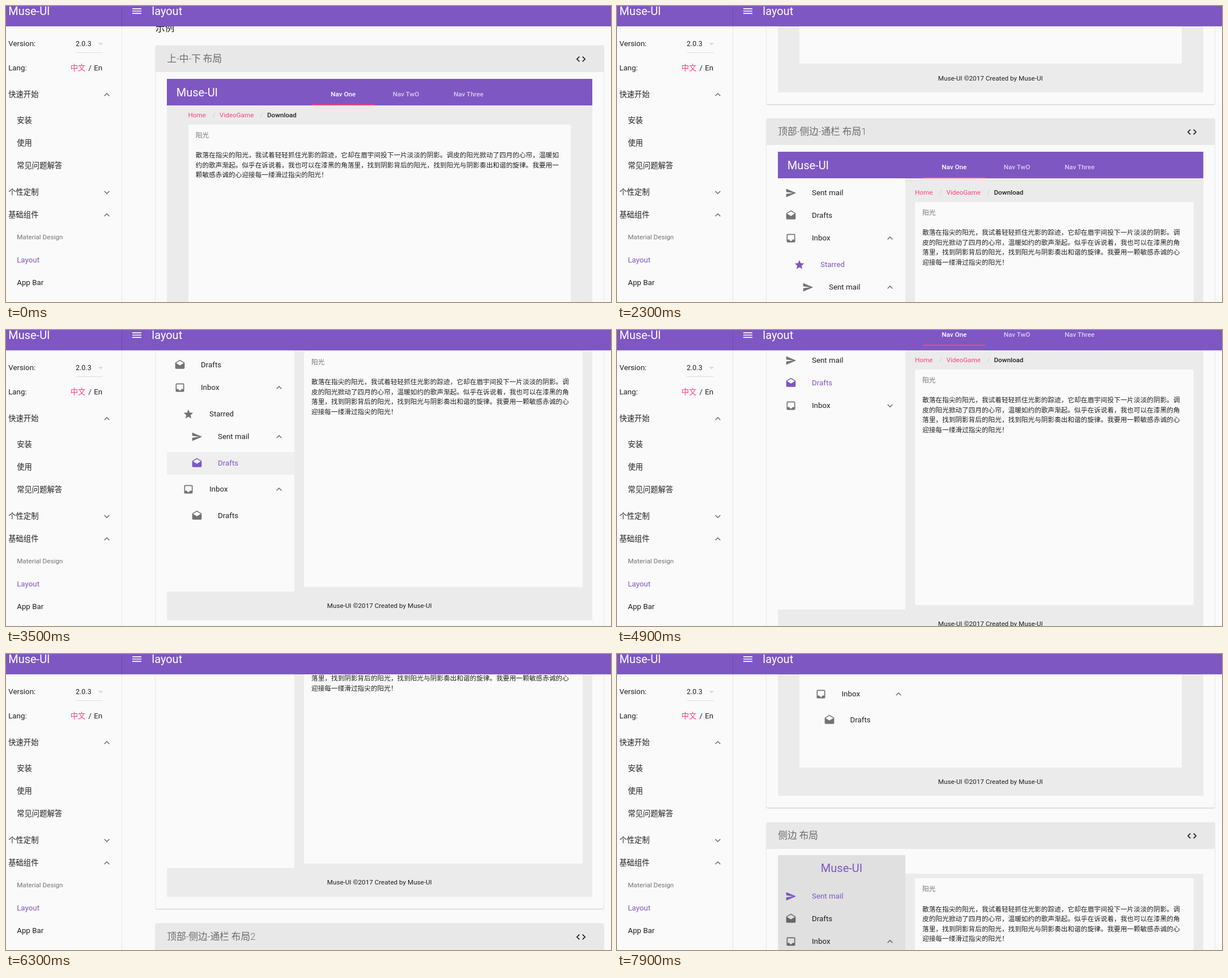
An HTML page that plays this animation: 1068 px wide and 524 px high, repeating every 8000 ms.

```html
<!DOCTYPE html>
<html lang="zh-CN">
<head>
<meta charset="utf-8">
<title>layout</title>
<style>
  html, body { margin: 0; width: 100%; height: 100%; overflow: hidden; background: #fafafa; }
  body {
    font-family: Roboto, "Noto Sans CJK SC", "Noto Sans CJK", sans-serif;
    color: rgba(0, 0, 0, .87);
    text-spacing-trim: space-all;
    text-autospace: no-autospace;
  }
  #stage { position: relative; width: 1068px; height: 524px; overflow: hidden; }
  #stage div, #stage svg { position: absolute; }
  .text { white-space: pre; line-height: 20px; }
  .card { background: #fafafa; border-radius: 2px; box-shadow: 0 1px 2px rgba(0,0,0,.2), 0 0 1px rgba(0,0,0,.16); }
  .body { font-size: 11.667px; line-height: 17.5px; font-weight: 300; }
  .tabs { z-index: 3; }
  .fixed { z-index: 2; }
</style>
</head>
<body>
<div id="stage"></div>
<script>
const PURPLE = '#7e57c2', PINK = '#ff4081', PAPER = '#fafafa', GRAY = '#ebebeb';
const DARK = 'rgba(0,0,0,.87)', MUTED = 'rgba(0,0,0,.54)', FADED = 'rgba(255,255,255,.7)';
const SMALL = 11.667, NORMAL = 13.333, LARGE = 16.667, TITLE = 20;
const ROW = 40, PAD = 6.667, TAB = 110.67, BAR = 47;
const LEFT = 284, WIDTH = 750.5;

const ICONS = {
  send: 'M2 21L23 12 2 3v7l15 2-15 2z',
  drafts: 'M22 8c0-.72-.37-1.35-.94-1.7L12 1 2.95 6.3C2.38 6.65 2 7.28 2 8v10c0 1.1.9 2 2 2h16c1.1 0 2-.9 2-2zM12 13L3.74 7.84 12 3l8.26 4.84z',
  inbox: 'M19 3H5c-1.1 0-2 .9-2 2v14c0 1.1.9 2 2 2h14c1.1 0 2-.9 2-2V5c0-1.1-.9-2-2-2zm0 12h-4c0 1.66-1.35 3-3 3s-3-1.34-3-3H5V5h14z',
  star: 'M12 17.27L18.18 21l-1.64-7.03L22 9.24l-7.19-.61L12 2 9.19 8.63 2 9.24l5.46 4.73L5.82 21z',
  code: 'M9.4 16.6L4.8 12l4.6-4.6L8 6l-6 6 6 6zm5.2 0l4.6-4.6-4.6-4.6L16 6l6 6-6 6z',
  more: 'M16.59 8.59L12 13.17 7.41 8.59 6 10l6 6 6-6z',
  menu: 'M2.4 6h19.2v2H2.4zm0 5h19.2v2H2.4zm0 5h19.2v2H2.4z',
  drop: 'M7 10l5 5 5-5z'
};

// [icon, label, list depth, indent, expandable]
const MAIL = [
  ['send', 'Sent mail', 0, 0], ['drafts', 'Drafts', 0, 0], ['inbox', 'Inbox', 0, 0, true],
  ['star', 'Starred', 1, 1], ['send', 'Sent mail', 1, 2, true], ['drafts', 'Drafts', 2, 2],
  ['inbox', 'Inbox', 1, 1, true], ['drafts', 'Drafts', 2, 2]
];
const PROSE = '散落在指尖的阳光，我试着轻轻抓住光影的踪迹，它却在眉宇间投下一片淡淡的阴影。' +
  '调皮的阳光掀动了四月的心帘，温暖如约的歌声渐起。似乎在诉说着，我也可以在漆黑的角落里，' +
  '找到阴影背后的阳光，找到阳光与阴影奏出和谐的旋律。我要用一颗敏感赤诚的心迎接每一缕滑过指尖的阳光！';

function box(parent, x, y, w, h, background = '', className = '') {
  const el = document.createElement('div');
  Object.assign(el.style, { left: x + 'px', top: y + 'px', width: w + 'px', height: h + 'px', background });
  el.className = className;
  parent.append(el);
  return el;
}

// cy is the vertical middle; align is the share of the text's width left of x
function text(parent, x, cy, string, size = NORMAL, color = DARK, weight = 400, align = 0) {
  const el = box(parent, x, cy - 10, 0, 20, '', 'text');
  Object.assign(el.style, { width: 'auto', fontSize: size + 'px', color, fontWeight: weight });
  if (align) el.style.transform = `translateX(${-100 * align}%)`;
  el.textContent = string;
  return el;
}

function icon(parent, cx, cy, name, color = MUTED, turned = false) {
  const svg = document.createElementNS('http://www.w3.org/2000/svg', 'svg');
  svg.setAttribute('viewBox', '0 0 24 24');
  Object.assign(svg.style, {
    left: cx - 10 + 'px', top: cy - 10 + 'px', width: '20px', height: '20px',
    fill: color, transform: turned ? 'rotate(180deg)' : ''
  });
  svg.innerHTML = `<path d="${ICONS[name]}"/>`;
  parent.append(svg);
  return svg;
}

function card(top, height, title) {
  const el = box(scroller, 264, top, 791, height, '', 'card');
  box(el, 0, 0, 791, 47, '#e8e8e8').style.borderRadius = '2px 2px 0 0';
  text(el, 20.3, 23.7, title, LARGE, MUTED, 300);
  icon(el, 750.5, 23.7, 'code', DARK);
  return box(scroller, LEFT, top + 59, WIDTH, height - 79);
}

function appBar(parent) {
  box(parent, 0, 0, WIDTH, BAR, PURPLE);
  text(parent, 16.7, 23.7, 'Muse-UI', TITLE, '#fff');
  const tabs = box(parent, 256, 0, TAB * 3, BAR, '', 'tabs');
  const labels = ['Nav One', 'Nav TwO', 'Nav Three'].map((label, i) =>
    text(tabs, TAB * (i + .5), 27.3, label, SMALL, i ? FADED : '#fff', 500, .5));
  return { labels, line: box(tabs, 0, BAR - 2, TAB, 2, PINK) };
}

function breadcrumb(parent, x, cy) {
  [[0, 'Home', PINK], [43.3, '/', '#ccc'], [55.5, 'VideoGame', PINK], [127, '/', '#ccc']]
    .forEach(([dx, label, color]) => text(parent, x + dx, cy, label, SMALL, color));
  text(parent, x + 139.5, cy, 'Download', SMALL, DARK, 500);
}

function article(parent, x, y, columns) {
  text(parent, x, y + 19, '阳光', SMALL, MUTED, 300);
  const el = box(parent, x, y + 46.2, (columns + .3) * SMALL, 80, '', 'body');
  el.textContent = PROSE;
}

function panel(parent, x, y, w, radius = 3) {
  box(parent, x, y, w, 416.7, PAPER).style.borderRadius = radius + 'px';
}

function footer(parent, cy) {
  text(parent, WIDTH / 2, cy, 'Muse-UI ©2017 Created by Muse-UI', SMALL, DARK, 400, .5);
}

function mailList(parent, x, y, width, selected) {
  const list = box(parent, x, y, width, 0);
  const foldTop = PAD + 3 * ROW;
  const fold = box(list, 0, foldTop, width, 247);
  fold.style.overflow = 'hidden';
  let cy = PAD - ROW / 2, last = 0;
  const rows = MAIL.map(([name, label, depth, indent, expandable], i) => {
    cy += ROW + PAD * Math.abs(depth - last);
    last = depth;
    const nested = depth > 0;
    const row = box(nested ? fold : list, 0, cy - ROW / 2 - (nested ? foldTop : 0), width, ROW);
    const color = i === selected ? PURPLE : MUTED;
    return {
      row,
      icon: icon(row, 23.3 + 15 * indent, 20, name, color),
      label: text(row, 60 + 15 * indent, 20, label, NORMAL, i === selected ? PURPLE : DARK),
      arrow: expandable && icon(row, width - 26.7, 20, 'more', MUTED, true)
    };
  });
  return { rows, fold };
}

const stage = document.getElementById('stage');
const scroller = box(stage, 0, 0, 1068, 2700);
text(scroller, 264, 40, '示例', LARGE, DARK, 300);

const first = card(70, 628.5, '上-中-下 布局');
box(first, 0, BAR, WIDTH, 502, GRAY);
const firstTabs = appBar(first);
breadcrumb(first, 37.5, 63.5);
panel(first, 37.5, 81, 675.5);
article(first, 50.8, 81, 55);
footer(first, 523.5);

const second = card(724, 645, '顶部-侧边-通栏 布局1');
box(second, 0, BAR, WIDTH, 518, GRAY);
appBar(second);
box(second, 0, BAR, 225, 467, PAPER);
const mail = mailList(second, 0, 46.7, 225, 3);
breadcrumb(second, 242, 71.7);
panel(second, 241.7, 89, 492.5);
article(second, 255, 89, 39);
footer(second, 539.4);

const third = card(1395, 628.5, '顶部-侧边-通栏 布局2');
box(third, 0, BAR, WIDTH, 502, GRAY);
appBar(third);
breadcrumb(third, 37.5, 64.2);
panel(third, 37.5, 82, 675.5, 0);
mailList(third, 37.5, 82, 202.5, 0);
article(third, 253.5, 82, 38);
footer(third, 523.5);

const fourth = card(2050, 600, '侧边 布局');
box(fourth, 225, 32, WIDTH - 225, 480, GRAY);
box(fourth, 0, -1, 225, 513, '#e0e0e0');
text(fourth, 112.5, 22, 'Muse-UI', TITLE, PURPLE, 400, .5);
mailList(fourth, 0, 45.3, 225, 0);
panel(fourth, 241.7, 40.4, 492.5, 0);
article(fourth, 255, 40.4, 39);

const drawer = box(stage, 0, 0, 204, 524, PAPER, 'fixed');
drawer.style.borderRight = '1px solid #e6e6e6';
text(drawer, 4.2, 66.5, 'Version:');
text(drawer, 123, 66.5, '2.0.3', 12.5);
icon(drawer, 167.3, 66.5, 'drop', '#d6d6d6');
box(drawer, 123, 82, 48, 1, '#dedede');
text(drawer, 4.2, 109.5, 'Lang:');
text(drawer, 113.8, 109.5, '中文', NORMAL, PINK, 300);
text(drawer, 145.5, 109.5, '/');
text(drawer, 155.3, 109.5, 'En');
[['快速开始', 156.5, true], ['个性定制', 329.7, false], ['基础组件', 369.7, true]].forEach(([label, cy, open]) => {
  text(drawer, 4.2, cy, label, NORMAL, DARK, 300);
  icon(drawer, 177.5, cy, 'more', MUTED, open);
});
[['安装', 203], ['使用', 243], ['常见问题解答', 283]]
  .forEach(([label, cy]) => text(drawer, 19.2, cy, label, NORMAL, DARK, 300));
text(drawer, 19.2, 409.3, 'Material Design', SMALL, MUTED);
text(drawer, 19.2, 449.5, 'Layout', NORMAL, PURPLE);
text(drawer, 19.2, 489.5, 'App Bar');

const header = box(stage, 0, 0, 1068, 36, PURPLE, 'fixed');
box(header, 204, 0, 1, 36, '#7049b0');
text(header, 4.2, 9, 'Muse-UI', TITLE, '#fff');
icon(header, 230.6, 9, 'menu', '#fff');
text(header, 257.3, 9, 'layout', TITLE, '#fff');

// Each run: start time, then one value per 100 ms
const SCROLL = [
  [1500, 25, 100, 180, 240, 300, 360, 420, 475, 525, 612, 664],
  [2700, 678, 718, 768, 827, 834],
  [4900, 802, 720, 668],
  [5700, 680, 712, 765, 830, 870, 905, 918],
  [6500, 950, 1050, 1110],
  [6900, 1160, 1320, 1419, 1428],
  [7400, 1437, 1505, 1600, 1680, 1735, 1752]
];
const TAB_SLIDE = [[700, .15, .6, .9, 1, 1.4, 1.85, 2]];
const FOLD = [[3900, .08, .3, .65, .9, 1]];
const SELECTED = [[0, 3], [3400, 5], [3900, 2], [4600, 1]];
const HOVERED = [[0, -1], [3400, 5], [3800, 2], [4400, 1], [4900, -1]];

function valueAt(runs, t) {
  let value = 0;
  for (const [start, ...values] of runs) {
    if (t >= start) value = values[Math.min(values.length - 1, Math.floor((t - start) / 100))];
  }
  return value;
}

function render(t) {
  scroller.style.top = -valueAt(SCROLL, t) + 'px';

  const slide = valueAt(TAB_SLIDE, t), active = Math.ceil(slide);
  firstTabs.line.style.left = slide * TAB + 'px';
  firstTabs.labels.forEach((el, i) => { el.style.color = i === active ? '#fff' : FADED; });

  const folded = valueAt(FOLD, t), selected = valueAt(SELECTED, t), hovered = valueAt(HOVERED, t);
  mail.fold.style.height = 247 * (1 - folded) + 'px';
  mail.rows[2].arrow.style.transform = `rotate(${180 * (1 - folded)}deg)`;
  mail.rows.forEach(({ row, icon, label }, i) => {
    row.style.background = i === hovered ? '#efefef' : '';
    icon.style.fill = i === selected ? PURPLE : MUTED;
    label.style.color = i === selected ? PURPLE : DARK;
  });
}

const begin = performance.now();
function tick() {
  render((performance.now() - begin) % 8000);
  requestAnimationFrame(tick);
}
render(0);
requestAnimationFrame(tick);
</script>
</body>
</html>
```
